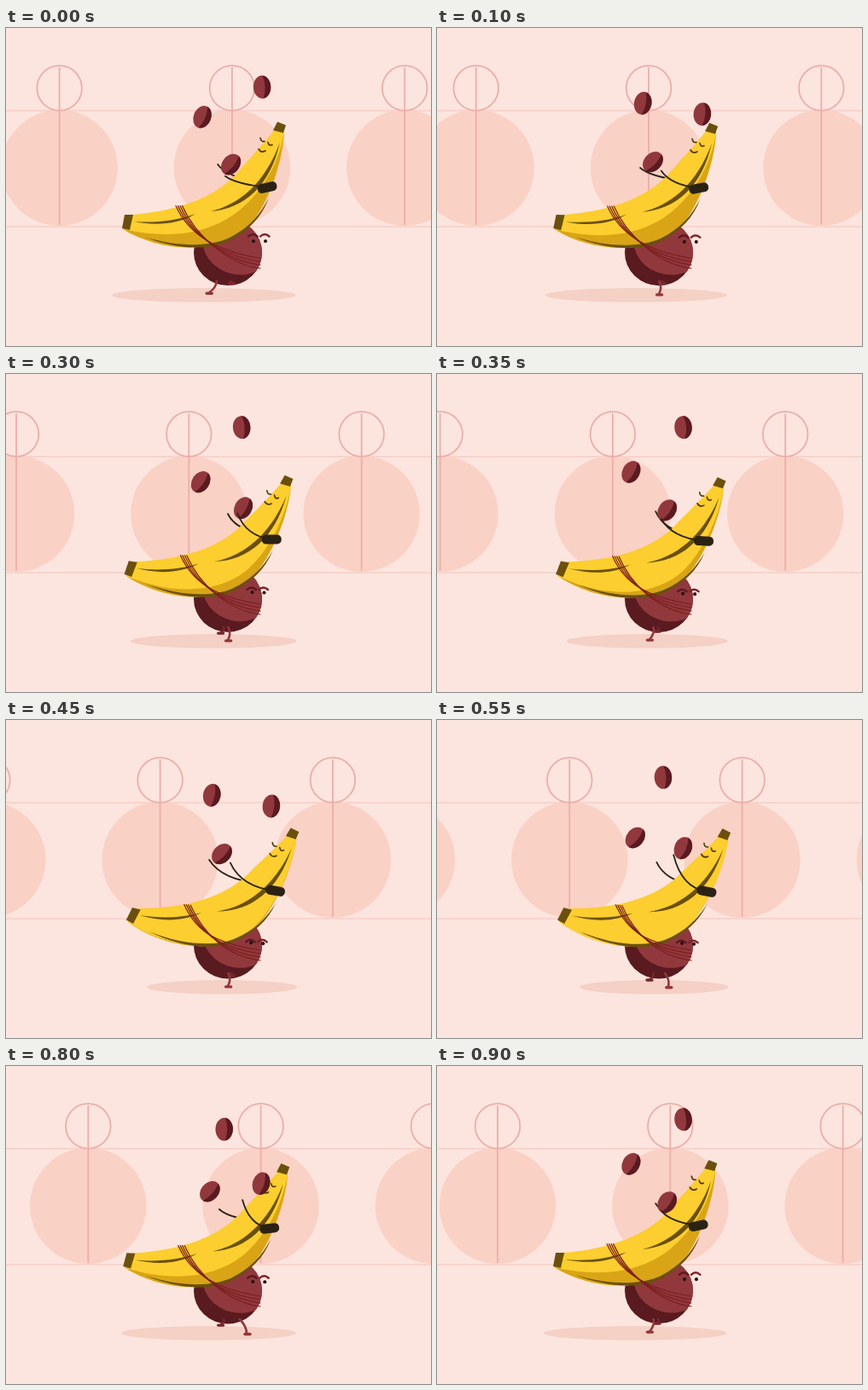
An HTML page with a canvas that plays this animation: 498 by 373 pixels, repeating every 0.95 s.

```html
<!DOCTYPE html>
<html lang="en">
<head>
<meta charset="utf-8">
<title>Juggling banana</title>
<style>
  html, body { margin: 0; width: 100%; height: 100%; overflow: hidden; background: #fce5de; }
  canvas { display: block; }
</style>
</head>
<body>
<canvas id="stage" width="498" height="373"></canvas>
<script>
const g = document.getElementById('stage').getContext('2d');
const { sin, cos, PI } = Math;
const STEPS = 24, BEAT = 8, TAU = PI * 2;
const PINK = '#fad1c5', ROSE = '#ebaeaa', RED = '#91383d', DARK = '#591a20', INK = '#2b2213';
const YELLOW = '#fcce2f', GOLD = '#d9a516', BROWN = '#6a500c';
const PIVOT = [128, 307];
const BODY = 'M148 219C205 214 245 198 270 171C286 152 301 137 314 120L326 122C324 158 307 208 284 233C245 268 180 262 137 236Z';

// Cosine wave with one crest per juggling beat, at step `crest`
const wave = (n, crest) => cos((n - crest) / BEAT * TAU);

function fill(d, color) {
  g.fillStyle = color;
  g.fill(new Path2D(d));
}

function line(d, color, width) {
  g.strokeStyle = color;
  g.lineWidth = width;
  g.stroke(new Path2D(d));
}

function ellipse(x, y, rx, ry, color, angle = 0) {
  g.beginPath();
  g.ellipse(x, y, rx, ry, angle, 0, TAU);
  g.fillStyle = color;
  g.fill();
}

// Runs `paint` in coordinates turned around a point
function turned(x, y, angle, paint) {
  g.save();
  g.translate(x, y);
  g.rotate(angle);
  g.translate(-x, -y);
  paint();
  g.restore();
}

function tilt(x, y, angle) {
  const c = cos(angle), s = sin(angle), dx = x - PIVOT[0], dy = y - PIVOT[1];
  return [PIVOT[0] + dx * c - dy * s, PIVOT[1] + dx * s + dy * c];
}

function background(n) {
  g.fillStyle = '#fce5de';
  g.fillRect(0, 0, 498, 373);
  const gap = 202.3, first = 62.6 - gap * n / STEPS;
  line('M0 97H498M0 233H498', '#f7d0c6', 1.5);
  for (let i = 0; i < 4; i++) {
    const x = first + i * gap;
    ellipse(x, 164, 68.2, 68, PINK);
    line(`M${x} 47V230M${x - 26.3} 70.5a26.3 26.3 0 1 0 52.6 0a26.3 26.3 0 1 0 -52.6 0`, ROSE, 1.8);
  }
}

function ball(y) {
  g.save();
  g.beginPath();
  g.ellipse(260, y, 40, 38.8, 0, 0, TAU);
  g.clip();
  g.fillStyle = DARK;
  g.fillRect(215, 220, 90, 90);
  ellipse(273, y - 13, 43, 39, RED, 0.2);
  g.restore();
}

function ballFace(sway) {
  for (const side of [0, 1]) {
    const x = 288.5 + 1.5 * sway + 14 * side, y = 256 - 6 * sway + side * (1 - sway) / 2;
    const brow = 253 - 8.5 * sway;
    ellipse(x, y, 2, 2.1, '#24100f');
    line(`M${x - 6} ${brow}q5 -5 10.5 0`, side ? '#7c2228' : DARK, 2.4);
  }
}

function banana(angle, shade) {
  const mix = (a, b) => a + (b - a) * shade;
  turned(...PIVOT, angle, () => {
    fill(BODY, YELLOW);
    fill(`M137 236C180 262 245 268 284 233C307 208 324 158 326 122
      C${mix(324, 319)} ${mix(158, 163)} ${mix(307, 298)} ${mix(208, 194)} ${mix(284, 272)} ${mix(233, 215)}
      C${mix(245, 240)} ${mix(268, 240)} ${mix(180, 195)} ${mix(262, 249)} 137 236Z`, GOLD);
    fill('M162 245C205 258 240 256 262 246C285 234 298 219 308 199C300 222 284 237 265 248C240 262 200 260 162 245Z', BROWN);
    fill('M240 215C274 207 304 181 321 134C310 184 280 212 240 215Z', BROWN);
    fill('M150 227C175 229 200 226 222 218C200 231 175 232 150 227Z', BROWN);
    fill('M318 110L328 114L325 123L313 120Z', BROWN);
    line('M298 129q1 5 5 4M307 134q1 5 5 3M296 142q3 5 8 2', '#4a3508', 1.6);
    turned(142, 228, 0.2 * (1 - shade), () => fill('M139 219L149 219L145 237L136 235Z', BROWN));
  });
}

function strings(angle) {
  for (let i = 0; i < 4; i++) {
    const [x, y] = tilt(199 + 2.5 * i, 208.5, angle * 1.25);
    line(`M${x} ${y}C${x + 14} ${y + 32} ${246 + 4 * i} ${262 + 5 * i} 298 ${270 + 4 * i}`, '#7c1f1d', 1.2);
  }
}

function arm([px, py], [hx, hy]) {
  line(`M${px} ${py}Q${hx * 0.75 + px * 0.25} ${py - 4} ${hx} ${hy}`, INK, 1.8);
}

function pad([x, y], angle) {
  turned(x, y, angle, () => {
    g.beginPath();
    g.roundRect(x - 11.5, y - 5.5, 23, 11, 5);
    g.fillStyle = INK;
    g.fill();
  });
}

// The throw is a lopsided loop: a circle bent by its second and third harmonics
function bean(lap) {
  const a = lap / STEPS * TAU;
  const x = 264.6 - 34.5 * cos(a) + 15.4 * sin(a) - 5.7 * sin(2 * a) + 3.8 * sin(3 * a);
  const y = 115.5 - 12.5 * cos(a) - 47.3 * sin(a) + 5.6 * cos(2 * a) + 5.1 * sin(2 * a) - 4.3 * cos(3 * a);
  turned(x, y, 0.35 + 0.42 * cos(a - 4.84), () => {
    ellipse(x, y, 10.3, 13.5, RED);
    fill(`M${x + 1} ${y - 13.4}q5 13.4 0 26.8a10.3 13.5 0 0 0 0 -26.8Z`, DARK);
  });
}

function leg(x, y, color) {
  const hip = 260 + (x - 260) * 0.6;
  line(`M${hip} 297Q${(hip + x) / 2 + 4} ${(297 + y) / 2} ${x - 1} ${y}`, color, 2.6);
  line(`M${x - 3} ${y}h6`, color, 3.4);
}

// One foot slides back with the ground while the other is tucked up
function legs(n) {
  const stride = (n + 4) % BEAT, slide = stride > 4 ? stride - 4 : stride;
  leg(258 - 9 * wave(stride, 1), 302 + 3 * wave(stride, 1), '#78272d');
  leg(283 - 11.2 * slide, 314.5 - 0.8 * slide, RED);
}

function draw() {
  const tick = Math.floor(performance.now() % 950 / 50);
  // The second half of the lap skips every third step
  const n = tick + Math.max(0, (tick - 7) >> 1);
  const sway = cos(n / STEPS * TAU), lean = (1 - sway) / 2, angle = 0.089 * lean;
  const grip = tilt(306, 187 - 2 * lean, angle);

  g.lineCap = 'round';
  background(n);
  const left = 146 - 22 * sway, right = 340.5 - sway;
  ellipse((left + right) / 2, 313.3, (right - left) / 2, 8.3, '#f4d0c5');
  ball(264 - 0.7 * sway);
  legs(n);
  ballFace(sway);
  arm(tilt(288, 178, angle), [249 + 11 * wave(n, 5.9), 164 - 4 * wave(n, 0)]);
  banana(angle, 1 - lean);
  strings(angle);
  for (let i = 0; i < 3; i++) bean(n + i * BEAT);
  arm(grip, [267 + 11 * wave(n, 4.5), 165.5 + 8.5 * wave(n, 0.3)]);
  pad(grip, -0.22 + 0.42 * lean);
  requestAnimationFrame(draw);
}
draw();
</script>
</body>
</html>
```
